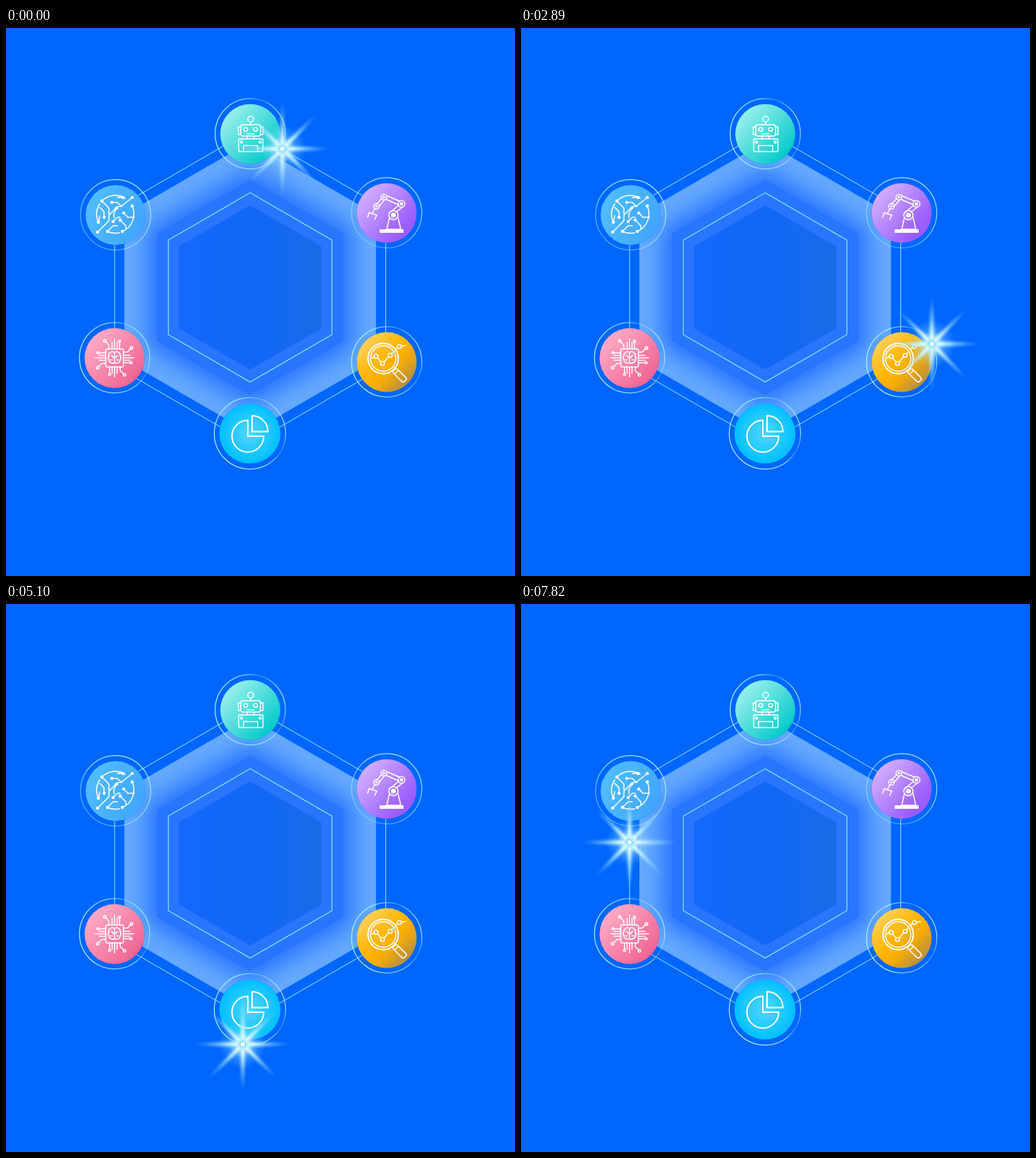
Recreate the animation shown at these times as an HTML page. Size 722 by 776 pixels, loop 7990 ms.

```html
<!DOCTYPE html>
<html lang="en">
<head>
<meta charset="utf-8">
<title>Hexagon orbit</title>
<style>
html, body { margin: 0; width: 100%; height: 100%; overflow: hidden; background: #0066ff; }
svg { display: block; width: 100vw; height: 100vh; }
.icon { fill: none; stroke: #fff; stroke-width: 1.5; stroke-linecap: round; stroke-linejoin: round; }
.solid { fill: #fff; stroke: none; }
</style>
</head>
<body>
<svg viewBox="0 0 722 776">
  <defs>
    <linearGradient id="teal" x1=".1" y1=".1" x2=".9" y2=".85"><stop offset="0" stop-color="#a0f2ec"/><stop offset="1" stop-color="#00c8c9"/></linearGradient>
    <linearGradient id="violet" x1=".1" y1=".15" x2=".8" y2=".75"><stop offset="0" stop-color="#d2b0ff"/><stop offset="1" stop-color="#9a5cff"/></linearGradient>
    <linearGradient id="amber" x1=".1" y1=".1" x2=".9" y2=".9"><stop offset="0" stop-color="#ffd366"/><stop offset=".45" stop-color="#ffb400"/><stop offset=".65" stop-color="#f5ab08"/><stop offset="1" stop-color="#a98a4c"/></linearGradient>
    <radialGradient id="cyan"><stop offset="0" stop-color="#55d6ff"/><stop offset="1" stop-color="#00bfff"/></radialGradient>
    <linearGradient id="pink" x1=".1" y1=".15" x2=".9" y2=".85"><stop offset="0" stop-color="#ffabc6"/><stop offset="1" stop-color="#f0628f"/></linearGradient>
    <linearGradient id="sky" x1="0" y1=".3" x2="1" y2=".7"><stop offset="0" stop-color="#50bdff"/><stop offset="1" stop-color="#40a5ff"/></linearGradient>
    <linearGradient id="rim" x1="0" y1=".7" x2="1" y2=".3"><stop offset="0" stop-color="#a5f4ff"/><stop offset=".6" stop-color="#a5f4ff" stop-opacity=".75"/><stop offset=".8" stop-color="#a5f4ff" stop-opacity=".3"/><stop offset="1" stop-color="#a5f4ff"/></linearGradient>
    <linearGradient id="rimUp" x1=".8" y1="0" x2=".2" y2="1"><stop offset="0" stop-color="#a5f4ff"/><stop offset="1" stop-color="#a5f4ff" stop-opacity=".4"/></linearGradient>
    <linearGradient id="core"><stop offset="0" stop-color="#1468fb"/><stop offset=".6" stop-color="#1268f5"/><stop offset="1" stop-color="#186ce6"/></linearGradient>
    <radialGradient id="ray"><stop offset="0" stop-color="#fff"/><stop offset=".3" stop-color="#d4fbff" stop-opacity=".85"/><stop offset=".65" stop-color="#a0e4ff" stop-opacity=".4"/><stop offset="1" stop-color="#80ccff" stop-opacity="0"/></radialGradient>
    <radialGradient id="halo"><stop offset="0" stop-color="#fff"/><stop offset=".22" stop-color="#e8fdff" stop-opacity=".85"/><stop offset=".55" stop-color="#a5e6ff" stop-opacity=".32"/><stop offset="1" stop-color="#80ccff" stop-opacity="0"/></radialGradient>
    <filter id="soft" x="-20%" y="-20%" width="140%" height="140%"><feGaussianBlur stdDeviation="15"/></filter>
    <filter id="haze" x="-20%" y="-20%" width="140%" height="140%"><feGaussianBlur stdDeviation="1"/></filter>
    <clipPath id="plate"><polygon data-r="206"/></clipPath>
  </defs>

  <rect width="722" height="776" fill="#0066ff"/>
  <polygon data-r="206" fill="#2574ff"/>
  <g clip-path="url(#plate)">
    <polygon data-r="206" fill="none" stroke="#65a8ff" stroke-width="66" filter="url(#soft)"/>
  </g>
  <polygon data-r="152.5" fill="#2a75ff"/>
  <polygon data-r="134" fill="none" stroke="#8eeaff" stroke-width="1.1"/>
  <polygon data-r="116.5" fill="url(#core)"/>
  <polygon data-r="222" fill="none" stroke="#8eeaff" stroke-width="1"/>
  <g id="discs"></g>

  <g class="icon">
    <circle cx="347" cy="129" r="4"/>
    <path d="M347 133v4M342 149.700h10M342 153v3.500M352 153v3.500"/>
    <rect x="333" y="137" width="28" height="16" rx="3"/>
    <circle cx="340" cy="143.500" r="2.800"/><circle cx="354" cy="143.500" r="2.800"/>
    <path d="M333 140h-3.500v11h3.500M361 140h3.500v11h-3.500"/>
    <rect x="330" y="157" width="34.500" height="18" rx="1.500"/>
    <circle cx="334" cy="161.500" r="1.500"/><circle cx="360.500" cy="161.500" r="1.500"/>
    <path d="M337 175v-8.500h20v8.500"/>
  </g>

  <g class="icon">
    <path d="M530 285h34v5h-34z" class="solid"/>
    <path d="M544 268l-4 17h20l-4-17M545 261l12-10M553.500 260.500l9-7M540 237.500l18 7.500M539 242.500l18 8M533 241.500l-7.500 8M537 243.500l-8.500 10M523 256.500l-3 5.500M513 268l2-6.500 11 3.500-3 6"/>
    <circle cx="549.500" cy="265" r="6.500"/><circle cx="549.500" cy="265" r="3.600" class="solid"/>
    <circle cx="561" cy="249" r="4.800"/><circle cx="561" cy="249" r="2.500" class="solid"/>
    <circle cx="536" cy="239.500" r="4"/><circle cx="536" cy="239.500" r="1.800" class="solid"/>
    <circle cx="525.500" cy="252.500" r="4"/><circle cx="525.500" cy="252.500" r="1.800" class="solid"/>
  </g>

  <g class="icon">
    <circle cx="535" cy="468" r="21.500" stroke-width="2"/>
    <circle cx="535" cy="468" r="18"/>
    <path d="M518 468l5-3M527 467l5 6M536.500 473l6-7.500M547 461.500l3-3.500M561 450.500l6-1M552 456l3-3"/>
    <circle cx="525" cy="465" r="2.800"/><circle cx="534" cy="475" r="2.800"/><circle cx="545" cy="463.500" r="2.800"/><circle cx="558" cy="451" r="2.800"/>
    <rect x="-10.500" y="-4" width="22" height="8" rx="3" transform="translate(558 491.500) rotate(45)"/>
    <path d="M550 481l2.500 2.500M556 485.500l-4.500 4.500"/>
  </g>

  <g class="icon" stroke-width="2" style="stroke-width:2">
    <path d="M343 555.500A22.500 22.500 0 1 0 365.500 578H343zM349 549v22.500h22.500A22.500 22.500 0 0 0 349 549z"/>
  </g>

  <g class="icon" id="chip">
    <rect x="141.500" y="454.500" width="25" height="25.500" rx="2"/>
    <path d="M153 459q-3-2-5 1-3 1-2 4-2 3 0 6 0 4 4 4 2 2 4-.5V460M155 459q3-2 5 1 3 1 2 4 2 3 0 6 0 4-4 4-2 2-4-.5M149 464q3 0 3 3M159 464q-3 0-3 3M148 470h3M157 470h3"/>
  </g>

  <g class="icon" id="circuit">
    <path d="M136 245A27 27 0 0 1 169 241M179 252A27 27 0 0 1 165 288M144 288A27 27 0 0 0 161 290M131 275A27 27 0 0 1 133 249"/>
    <path d="M130 289l16-16v-8l12-12 6-1 15-12M136 245l10 10v8M150 247h8l6 6M166 240h-8M139 268v-8l-6-6M157 255l-4 8v6M152 274l6-6h4M162 272l8 8v4M167 262l6 6h9M144 288l8-8h6M131 275l2-9"/>
  </g>

  <g id="star">
    <circle r="34" fill="url(#halo)"/>
    <g id="rays" filter="url(#haze)"></g>
    <circle r="9" fill="url(#halo)"/>
    <g id="ticks" stroke="#35bdf5" stroke-width="1" opacity=".8"></g>
  </g>
</svg>
<script>
const NS = 'http://www.w3.org/2000/svg';
const $ = id => document.getElementById(id);

function add(parent, tag, attrs) {
  const el = document.createElementNS(NS, tag);
  for (const k in attrs) el.setAttribute(k, attrs[k]);
  parent.appendChild(el);
  return el;
}

function hexagon(r) {
  return Array.from({ length: 6 }, (_, i) => {
    const a = (i * 60 - 90) * Math.PI / 180;
    return (346.3 + r * Math.cos(a)).toFixed(1) + ',' + (367.3 + r * Math.sin(a)).toFixed(1);
  }).join(' ');
}
document.querySelectorAll('[data-r]').forEach(p => p.setAttribute('points', hexagon(+p.dataset.r)));

function disc(cx, cy, fill, rim, rx = 42.5) {
  const g = $('discs');
  add(g, 'circle', { cx, cy, r: rx + 7.3, fill: 'none', stroke: `url(#${rim})`, 'stroke-width': 1.2 });
  add(g, 'ellipse', { cx, cy: cy + .4, rx, ry: 42.3, fill: '#0066ff' });
  add(g, 'ellipse', { cx, cy: cy + .4, rx, ry: 42.3, fill: `url(#${fill})` });
}
disc(346.5, 149.7, 'teal', 'rim');
disc(540, 261.6, 'violet', 'rimUp');
disc(540, 472.7, 'amber', 'rim');
disc(346, 574, 'cyan', 'rim', 43.3);
disc(154, 467, 'pink', 'rim');
disc(155.5, 264.5, 'sky', 'rimUp');

// Chip pins: one side repeated four times
for (let turn = 0; turn < 4; turn++) {
  const g = add($('chip'), 'g', { transform: `translate(154 467) rotate(${turn * 90})` });
  add(g, 'path', { d: 'M-3.5-13v-9M0-13v-14M3.500-13v-9M-8-13v-5l-5-5M7-13v-9' });
  add(g, 'circle', { cx: -14, cy: -24, r: 1.8 });
  add(g, 'circle', { cx: 7, cy: -23.5, r: 1.6 });
}

const nodes = [[130, 289], [179, 240], [136, 245], [131, 275], [144, 288], [165, 288], [179, 252],
  [166, 240], [150, 247], [157, 255], [162, 272], [152, 274], [139, 268], [167, 262]];
for (const [cx, cy] of nodes) add($('circuit'), 'circle', { cx, cy, r: 2.3, class: 'solid' });

for (let a = 0; a < 180; a += 45) {
  add($('rays'), 'ellipse', { rx: 68, ry: a % 90 ? 5.5 : 6, fill: 'url(#ray)', transform: `rotate(${a})` });
}
for (let a = 0; a < 360; a += 45) {
  add($('ticks'), 'path', { d: 'M3 0h3', transform: `rotate(${a})` });
}

const track = document.createElementNS(NS, 'path');
track.setAttribute('d', 'M392 171L498.500 233.500A50 50 0 1 1 540 311.500V423' +
  'A50 50 0 1 1 498.700 501.500L394.900 561.300A50.500 50.500 0 1 1 297.100 561.300' +
  'L192.700 499.200A50 50 0 1 1 154 417V330');

// Travelled distance at each time (ms, px)
const pace = [[0, 0], [680, 122.5], [1190, 212], [2040, 354.5], [2380, 414.5], [3740, 622],
  [4760, 790], [5100, 868], [5950, 1044], [6970, 1221], [7820, 1351]];
const LOOP = 7990, STEP = 170;

function distance(t) {
  const i = Math.max(1, pace.findIndex(p => p[0] >= t));
  const [t0, s0] = pace[i - 1], [t1, s1] = pace[i];
  return s0 + (s1 - s0) * (t - t0) / (t1 - t0);
}

function render(ms) {
  const t = Math.floor(ms % LOOP / STEP) * STEP;
  const p = track.getPointAtLength(distance(t));
  $('star').setAttribute('transform', `translate(${p.x.toFixed(2)} ${p.y.toFixed(2)})`);
}

const start = performance.now();
function tick() {
  render(performance.now() - start);
  requestAnimationFrame(tick);
}
tick();
</script>
</body>
</html>
```
